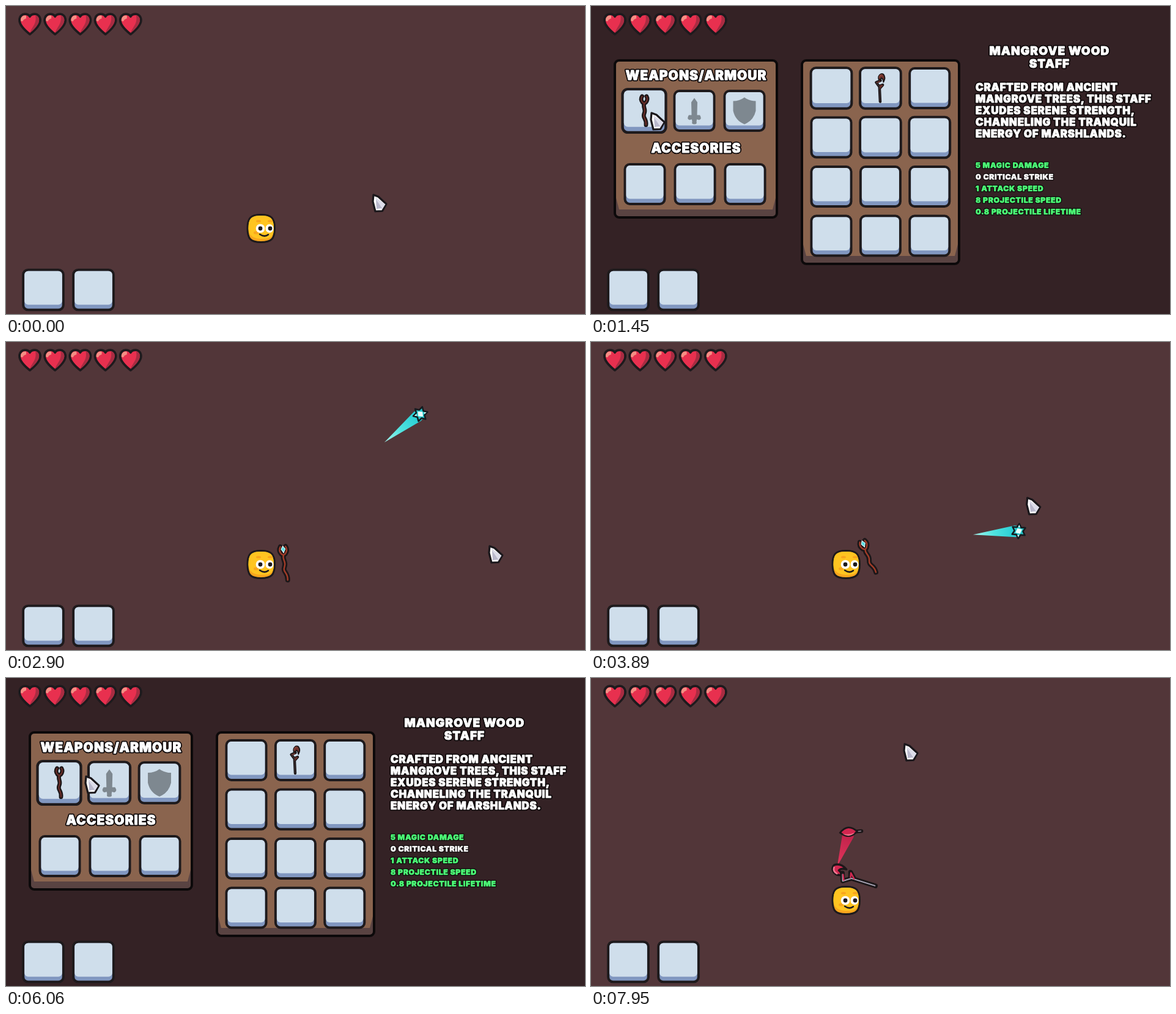
Recreate the animation shown at these times as an HTML page. Size 947 by 504 pixels, loop 8 s.

```html
<!DOCTYPE html>
<html lang="en">
<head>
<meta charset="utf-8">
<title>Staff inventory</title>
<style>
  html, body { margin: 0; width: 100%; height: 100%; overflow: hidden; background: #523639; }
  svg { display: block; width: 100%; height: 100%; }
  text { font-family: Inter, "DejaVu Sans", sans-serif; font-weight: 900; fill: #fff; stroke: #fff; stroke-width: .9; stroke-linejoin: round; }
  text.rim { stroke: #0e090a; stroke-width: 4.4; }
  .head { font-size: 21px; text-anchor: middle; letter-spacing: 1px; }
  .title { font-size: 19.2px; text-anchor: middle; letter-spacing: 1px; }
  .body { font-size: 17px; letter-spacing: .7px; }
  .stat { font-size: 12.4px; letter-spacing: .55px; stroke-width: .5; }
  .stat.rim { stroke-width: 3; }
  .good { fill: #4dff78; stroke: #4dff78; }
  .game { --bark: #a23c28; --bloom: #d12850; --rod: #aaa7b8; --shine: #f17891; }
  .icon { --bark: #6e2e28; --bloom: #74332c; --rod: #3f3334; --shine: #8c4437; }
</style>
</head>
<body>
<svg viewBox="0 0 947 504" preserveAspectRatio="none">
  <defs>
    <linearGradient id="cyan"><stop offset="0" stop-color="#a8f6ee"/><stop offset=".45" stop-color="#4fe3df"/><stop offset="1" stop-color="#1fc9d2"/></linearGradient>
    <linearGradient id="rose"><stop offset="0" stop-color="#e2365c"/><stop offset="1" stop-color="#bd2049"/></linearGradient>

    <g id="heart">
      <path d="M0 17C-5 13-17 3-17-6C-17-13-12-16-8.500-16C-4-16-1-14 0-12C1-14 4-16 8.500-16C12-16 17-13 17-6C17 3 5 13 0 17Z" fill="#e8304f" stroke="#1d1a1d" stroke-width="3.800" stroke-linejoin="round"/>
      <path d="M9-14C14-13 15.200-10 15.200-6C15.200 2 5 11 0 15C3 5 12 0 9-14Z" fill="#a92c42"/>
      <path d="M-15-5C-15.500-11-11-14.500-6-13.500L-6-9L-10-7L-12-4Z" fill="#f58f84"/>
    </g>

    <g id="hero" transform="translate(417 364)">
      <path d="M-22 0C-22-17-17-22.500 0-22.500S22.500-17 22.500 0S17 22.500 0 22.500S-22 17-22 0Z" fill="#f9a61d" stroke="#1d1a1c" stroke-width="3"/>
      <path d="M-20.500 0C-20.500-16-16-21 0-21S21-16 21 0C21 14 14 17 2 17S-20.500 13-20.500 0Z" fill="#ffc421"/>
      <g fill="#f9a61d"><ellipse cx="-4" cy="-12" rx="4" ry="2"/><ellipse cx="15" cy="-12" rx="4" ry="2"/><ellipse cx="-8" cy="7" rx="4" ry="2.500"/></g>
      <circle cx="-1" cy="0" r="7.300" fill="#fff"/><ellipse cx="14" cy="0" rx="6.500" ry="7" fill="#fff"/>
      <g fill="#1d1a1c"><circle cx="-1" r="3.400"/><circle cx="15" r="3.400"/></g>
      <path d="M-2 9.500Q6 15 12 10" fill="none" stroke="#1d1a1c" stroke-width="2.500" stroke-linecap="round"/>
    </g>

    <g id="cursor" stroke-linejoin="round">
      <path d="M1 1L9 4L22 16L15.500 27.500L4 28L0 12Z" fill="#fff" stroke="#1a171b" stroke-width="3.200"/>
      <path d="M3 4L20.500 16.500L14.500 26L13 22Z" fill="#dcdce9"/>
      <path d="M5 8L15 23L6 24Z" fill="#b9b8cc"/>
    </g>

    <path id="forkLine" d="M-4-26Q-8-20-3-14L0-12L3-14Q8-20 4.500-26M0-12C-3-4 4-2 0 7S5 16 3.500 29" fill="none" stroke-linecap="round" stroke-linejoin="round"/>
    <g id="fork">
      <use href="#forkLine" stroke="#1c1719" stroke-width="8"/>
      <use href="#forkLine" style="stroke:var(--bark)" stroke-width="2.400"/>
    </g>
    <path id="gem" d="M0-27L3.500-22L.5-16L-3-22Z" fill="#56dfe3" stroke="#fff" stroke-width="1"/>

    <g id="hook" fill="none" stroke-linecap="round" stroke-linejoin="round">
      <path d="M1 37L-1-4L-10-16L2-21M0-6L8-9L0 0" stroke="#1c1719" stroke-width="7.600"/>
      <path d="M-2-22C-7-33 2-43 10-38Q17-29 10-17Q9-27 4-28Q3-23-2-22Z" style="fill:var(--bloom)" stroke="#1c1719" stroke-width="3.400"/>
      <path d="M1 36L-1-4L-10-16L0-20" style="stroke:var(--rod)" stroke-width="2"/>
      <path d="M0-6L7-8L0 0M-8-15L0-19" style="stroke:var(--bloom)" stroke-width="2.500"/>
      <path d="M-2-29Q-1-37 6-37" style="stroke:var(--shine)" stroke-width="2.500"/>
    </g>

    <g id="star" stroke-linejoin="round">
      <path d="M0-12L3.500-6L10.500-6L7 0L10.500 6L3.500 6L0 12L-3.500 6L-10.500 6L-7 0L-10.500-6L-3.500-6Z" fill="#25c5c9" stroke="#151c20" stroke-width="2.600"/>
      <path d="M0-6L5 0L0 6L-5 0ZM-9-5L-5-5L-6-2ZM9 5L5 5L6 2Z" fill="#e9fffc"/>
    </g>
    <g id="leaf" stroke="#1c1719" stroke-linecap="round">
      <path d="M11 0L20 0" stroke-width="6"/><path d="M14 0L19 0" stroke="#8f8290" stroke-width="1.500"/>
      <path d="M-15 0Q-1-15 13 0Q-1 13-15 0Z" fill="#d3264f" stroke-width="2.800"/>
      <path d="M-11 2Q-1 10 9 2Q-1 5-11 2Z" fill="#f3728b" stroke="none"/>
    </g>

    <path id="sword" d="M0-21L5-14L4.500 7L9 7Q13 13 8 15L4 14L3.500 18Q5 22 0 22Q-5 22-3.500 18L-4 14L-8 15Q-13 13-9 7L-4.500 7L-5-14Z" fill="#7e8890"/>
    <path id="shield" d="M0-22Q8-16 18.500-16L18.500 0Q15 16 0 22Q-15 16-18.500 0L-18.500-16Q-8-16 0-22Z" fill="#7e8890"/>
  </defs>
  <g id="scene"></g>
  <g id="hud"></g>
  <g id="top"></g>
</svg>
<script>
const LOOP = 8000;
const HERO = { x: 417, y: 364 };
const SPEED = 0.406, LIFE = 800, BURST = 330, TRAIL = 75;
const MENUS = [[320, 1600], [5380, 7450]];
const TIPS = [[470, 570], [1090, 1600], [5740, 6200]];
const SHOTS = [
  { at: 2115, kind: "star" }, { at: 3280, kind: "star" },
  { at: 4440, kind: "star" }, { at: 7780, kind: "leaf" }
];
const DRAGS = [
  { from: 570, to: 1080, item: "fork" },
  { from: 6200, to: 6480, item: "fork" },
  { from: 6680, to: 7120, item: "hook" }
];
// Pointer stops: time, x, y
const STOPS = [
  [0, 600, 308], [130, 600, 308], [560, 393, 138], [1080, 85, 170], [1450, 98, 174],
  [1570, 98, 175], [1640, 165, 190], [1900, 675, 188], [2115, 690, 149], [2300, 740, 205],
  [2550, 770, 250], [2900, 790, 333], [3280, 818, 332], [3500, 818, 368], [4300, 600, 132],
  [4440, 583, 150], [4900, 686, 177], [5300, 686, 177], [5800, 92, 168], [5950, 105, 165],
  [6060, 130, 160], [6200, 95, 165], [6480, 393, 138], [6680, 473, 138], [7030, 169, 152],
  [7150, 169, 152], [7700, 505, 109], [7950, 512, 107], [8000, 512, 107]
];
const SLOT = {
  weapons: [87, 169, 251].map(x => [x, 171.5]),
  extras: [88, 170, 252].map(x => [x, 291.5]),
  bag: Array.from({ length: 12 }, (_, i) => [393 + i % 3 * 80.4, 134.5 + Math.floor(i / 3) * 80.5])
};

const [scene, hud, overlay] = ["scene", "hud", "top"].map(id => document.getElementById(id));
const within = (t, spans) => spans.find(([a, b]) => t >= a && t < b);
const put = (id, x, y, rot = 0, k = 1) =>
  `<use href="#${id}" transform="translate(${x} ${y}) rotate(${rot}) scale(${k})"/>`;
const label = (cls, x, y, s) =>
  [cls + " rim", cls].map(c => `<text class="${c}" x="${x}" y="${y}">${s}</text>`).join("");

function pointer(t) {
  let i = 1;
  while (i < STOPS.length - 1 && STOPS[i][0] < t) i++;
  const [ta, xa, ya] = STOPS[i - 1], [tb, xb, yb] = STOPS[i];
  const u = Math.min(1, Math.max(0, (t - ta) / (tb - ta))), e = u * u * (3 - 2 * u);
  return { x: xa + (xb - xa) * e, y: ya + (yb - ya) * e };
}

function aim(t) {
  const p = pointer(t);
  return Math.atan2(p.y - HERO.y, p.x - HERO.x);
}

const dragAt = t => DRAGS.find(d => t >= d.from && t < d.to);

function over(t, [x, y]) {
  const p = pointer(t);
  return !dragAt(t) && Math.abs(p.x - x) < 44 && Math.abs(p.y - y) < 36;
}

// Slots swell under the pointer and stay a little larger after a visit
function swell(t, c) {
  let recent = 0, visited = false;
  for (let i = 0; i < 6; i++) recent += over(t - i * 20, c) / 6;
  for (let s = within(t, MENUS)[0]; s < t && !visited; s += 20) visited = over(s, c);
  return 1 + 0.065 * recent + 0.025 * visited;
}

function slot([x, y], k = 1, inner = "", picked = false) {
  const [edge, base, face] = picked ? ["#fff", "#526b97", "#8a9bb7"] : ["#1e1a1c", "#8197c0", "#cfdeeb"];
  return `<g transform="translate(${x} ${y}) scale(${k})">
    <rect x="-32.5" y="-32.5" width="65" height="65" rx="8" fill="${base}" stroke="${edge}" stroke-width="4"/>
    <rect x="-30.5" y="-30.5" width="61" height="54.5" rx="6" fill="${face}"/>${inner}</g>`;
}

function panel(x, y, w, h) {
  return `<rect x="${x}" y="${y}" width="${w}" height="${h}" rx="7" fill="#594342" stroke="#0c090a" stroke-width="4"/>
    <path d="M${x + 2} ${y + 8}q0-6 6-6h${w - 16}q6 0 6 6v${h - 40}l-5 19h${14 - w}l-5-19z" fill="#8a644e"/>`;
}

const panels = panel(39, 89, 265, 257) + panel(345, 89, 257, 333) +
  label("head", 172, 120.5, "WEAPONS/ARMOUR") + label("head", 172, 239.5, "ACCESORIES");

const tooltip = label("title", 750, 80, "MANGROVE WOOD") + label("title", 750, 101, "STAFF") +
  ["CRAFTED FROM ANCIENT", "MANGROVE TREES, THIS STAFF", "EXUDES SERENE STRENGTH,",
    "CHANNELING THE TRANQUIL", "ENERGY OF MARSHLANDS."]
    .map((s, i) => label("body", 629, 138.5 + i * 19, s)).join("") +
  ["5 MAGIC DAMAGE", "0 CRITICAL STRIKE", "1 ATTACK SPEED", "8 PROJECTILE SPEED", "0.8 PROJECTILE LIFETIME"]
    .map((s, i) => label(i === 1 ? "stat" : "stat good", 629, 265 + i * 19, s)).join("");

const icon = id =>
  `<g class="icon">${id === "fork" ? put("fork", 0, -1.5, 0, 0.78) : put("hook", -1, 0, 0, 0.58)}</g>`;

function menu(t) {
  const drag = dragAt(t), p = pointer(t);
  const weapons = [
    t >= 1080 && t < 6200 ? icon("fork") : put("sword", 0, 0),
    t >= 7120 ? icon("hook") : put("sword", 0, 0),
    put("shield", 0, 0)
  ];
  const bag = [t < 570 || t >= 6480 ? icon("fork") : "", t < 6680 ? icon("hook") : ""];
  const row = (list, items) => list.map((c, i) => {
    const picked = drag && Math.abs(p.x - c[0]) < 34 && Math.abs(p.y - c[1]) < 34;
    return slot(c, swell(t, c), items[i], picked);
  }).join("");
  return panels + row(SLOT.weapons, weapons) + row(SLOT.extras, []) + row(SLOT.bag, bag) +
    (within(t, TIPS) ? tooltip : "");
}

function shot(s, t) {
  const age = t - s.at;
  if (age < 0 || age > LIFE + BURST) return "";
  const a = aim(s.at), c = Math.cos(a), n = Math.sin(a), d = SPEED * Math.min(age, LIFE);
  const x = HERO.x + 38 * c + 32 * n + d * c, y = HERO.y + 38 * n - 32 * c + d * n;
  const star = s.kind === "star", paint = star ? "cyan" : "rose";
  if (age > LIFE) {
    const u = (age - LIFE) / BURST, r = 65 * (1 - (1 - u) ** 2), w = 5 * (1 - u);
    let bits = "";
    for (let i = 0; i < 10; i++)
      bits += `<path d="M${r} 0L${r * 0.75} ${w}L${r * 0.35} 0L${r * 0.75} ${-w}Z" transform="rotate(${i * 36 + 9})"/>`;
    return `<g transform="translate(${x} ${y})" fill="#3fdcdc">${bits}</g>`;
  }
  const len = Math.max(0, Math.min(TRAIL, d - 10));
  return `<path d="M${-len} 0L-6-9.500L1-8L1 8L-6 9.500Z" fill="url(#${paint})" transform="translate(${x} ${y}) rotate(${a * 180 / Math.PI})"/>` +
    put(s.kind, x, y, star ? age * 0.4 : (age - 170) * 0.6 - 5);
}

function world(t) {
  const held = t >= 7450 ? "hook" : t >= 1600 && t < 5380 ? "fork" : "";
  const staff = held && `<g class="game" transform="translate(${HERO.x} ${HERO.y}) rotate(${aim(t) * 180 / Math.PI}) translate(38 0)">
    <use href="#${held}"/>${held === "fork" ? '<use href="#gem"/>' : ""}</g>`;
  return SHOTS.map(s => shot(s, t)).join("") + staff + '<use href="#hero"/>';
}

function draw(t) {
  const open = within(t, MENUS), p = pointer(t), drag = dragAt(t);
  scene.innerHTML = `<rect width="947" height="504" fill="${open ? "#342225" : "#523639"}"/>` +
    (open ? menu(t) : world(t));
  overlay.innerHTML = (drag ? `<g transform="translate(${p.x - 5} ${p.y})">${icon(drag.item)}
    <circle cx="-1" cy="-1" r="12" fill="#c9c524" opacity=".75"/></g>` : "") + put("cursor", p.x, p.y);
}

hud.innerHTML = [0, 1, 2, 3, 4].map(i => put("heart", 39 + i * 41.2, 29.2)).join("") +
  [61, 143].map(x => slot([x, 464.5], 1.01)).join("");

function tick(now) {
  draw(now % LOOP);
  requestAnimationFrame(tick);
}
draw(0);
requestAnimationFrame(tick);
</script>
</body>
</html>
```
